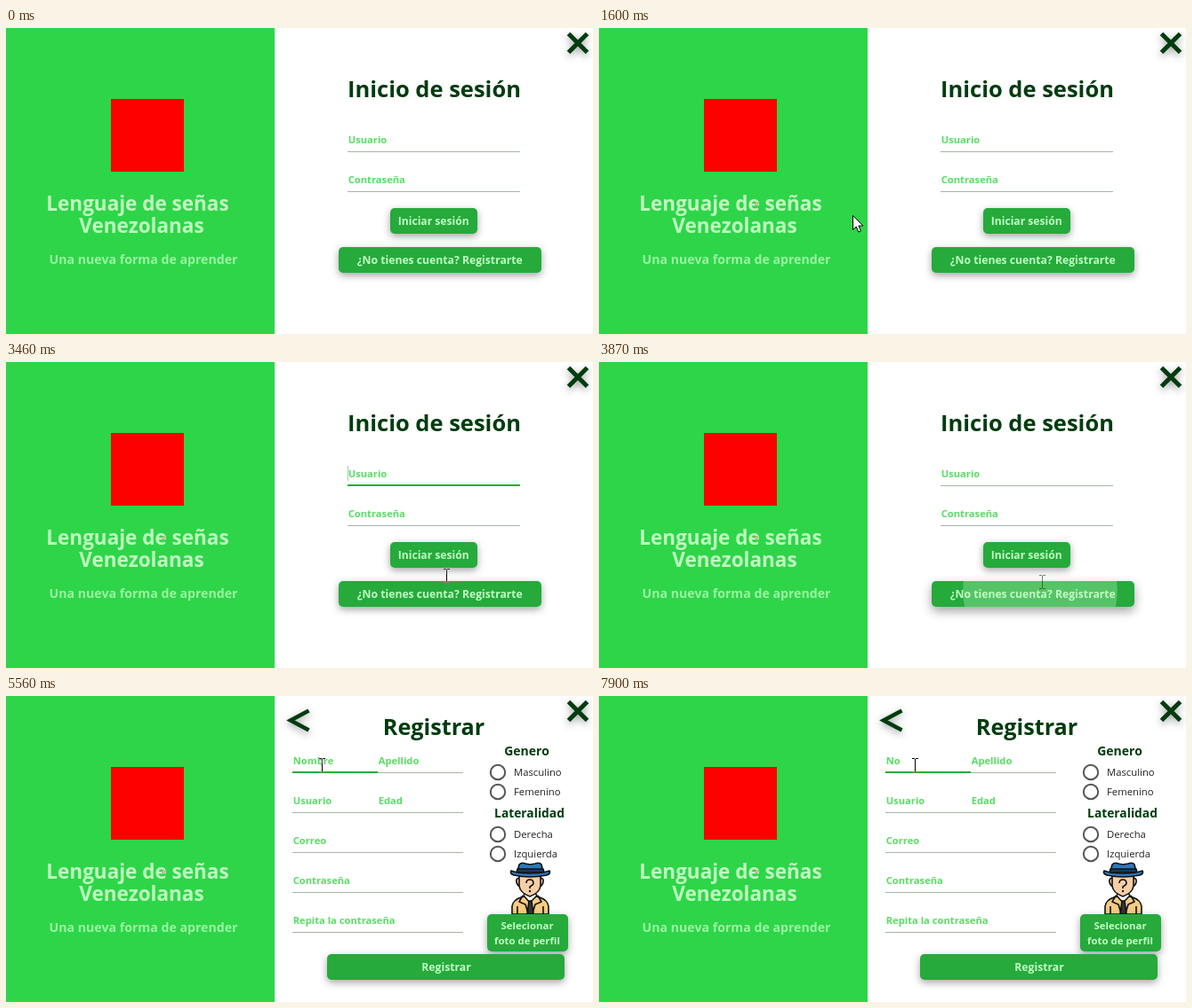
Recreate the animation shown at these times as an HTML page. Size 660x345 px, loop 8 s.

```html
<!DOCTYPE html>
<html lang="es">
<head>
<meta charset="utf-8">
<title>Inicio de sesión</title>
<style>
html, body { margin: 0; width: 100%; height: 100%; overflow: hidden; background: #fff; }
svg { display: block; width: 660px; height: 345px; }
text { font-family: "Open Sans", "Noto Sans", sans-serif; font-weight: 700; }
.mid { text-anchor: middle; }
.prompt { font-size: 11.2px; fill: #57dd62; }
.dark { fill: #003c0f; }
.plain { font-size: 11.3px; font-weight: 400; fill: #222; }
.btn { fill: #26aa3b; filter: drop-shadow(0 3px 4.5px rgba(0,0,0,.36)); }
.raised { filter: drop-shadow(0 5px 6px rgba(0,0,0,.36)); }
.label { fill: #c0ffc3; text-anchor: middle; }
.icon { fill: none; stroke: #003c0f; filter: drop-shadow(0 3px 4px rgba(0,0,0,.38)); }
#beam { mix-blend-mode: difference; }
.solid { stroke: #fff; }
.ghost { stroke: #a06080; }
</style>
</head>
<body>
<svg id="stage" viewBox="0 0 660 345" xmlns="http://www.w3.org/2000/svg"></svg>
<script>
const LOOP = 8000;
const GREEN = '#26aa3b';

const text = (x, y, s, cls, size, extra = '') =>
  `<text x="${x}" y="${y}" class="${cls}" ${size ? `font-size="${size}"` : ''} ${extra}>${s}</text>`;
const button = (x, y, w, h, id = '') =>
  `<rect x="${x}" y="${y}" width="${w}" height="${h}" rx="5" class="btn" ${id && `id="${id}"`}/>`;
const rule = (x, y, w) => `<rect x="${x}" y="${y}" width="${w}" height="1" fill="#a3b8a6"/>`;
const field = (x, y, w, s, id = '') => rule(x, y + 9, w) + text(x + 0.7, y, s, 'prompt', 0, id && `id="${id}"`);
const focusBar = (id, y) => `<rect id="${id}" y="${y}" height="2" fill="${GREEN}"/>`;
const caret = id => `<rect id="${id}" width="1" height="17" fill="#a9cdae"/>`;
const radio = (y, s) =>
  `<circle cx="553" cy="${y}" r="8.2" fill="#fff" stroke="#565656" stroke-width="2"/>` +
  text(571, y + 4, s, 'plain');

const brand = `
  <rect width="302" height="345" fill="#2ed549"/>
  <rect x="118" y="80" width="82" height="82" fill="#f00"/>
  ${text(148, 206, 'Lenguaje de señas', 'mid', 22.5, 'fill="#c0fcc0"')}
  ${text(152.5, 231, 'Venezolanas', 'mid', 22.5, 'fill="#c0fcc0"')}
  ${text(154.5, 266, 'Una nueva forma de aprender', 'mid', 14.15, 'fill="#9bf3a1"')}
  <circle id="speck" cx="177" cy="198" r="1.6" fill="none" stroke="#d98c72"/>`;

const login = `
  ${text(481.5, 78, 'Inicio de sesión', 'mid dark', 25.5)}
  ${field(384, 130, 194, 'Usuario')}
  ${field(384, 175, 194, 'Contraseña')}
  ${focusBar('userBar', 138)}${caret('userCaret')}
  ${button(432, 203, 98, 29)}
  ${text(480.7, 222, 'Iniciar sesión', 'label', 12.1)}
  ${button(374, 247, 228, 29, 'join')}
  <circle id="ripple" cx="496" cy="258" fill="#b8f5c0" opacity=".33" clip-path="url(#clip)"/>
  ${text(487.8, 266, '¿No tienes cuenta? Registrarte', 'label', 12.2)}`;

const avatar = `
  <g stroke="#111" stroke-width="1.6" stroke-linejoin="round">
    <path d="M569 246V237Q570 230 579 227L589 224L600 227Q609 230 610 237V246Z" fill="#f6cb83"/>
    <path d="M582 225L589 233L597 225L594 221H584Z" fill="#fff"/>
    <path d="M588 231L586 246H593L591 231Z" fill="#33363d"/>
    <path d="M581 225L577 232L584 235L587 245M598 225L602 232L595 235L592 245" fill="none"/>
    <path d="M575 237V246M604 237V246" fill="none"/>
    <path d="M577 205Q573 206 574 210T578 215M601 205Q605 206 604 210T600 215" fill="#f8cfa4"/>
    <path d="M577 201H601V214Q600 222 589 226Q578 222 577 214Z" fill="#f8cfa4"/>
    <path d="M575 198L577 190Q580 187 584 189L589 190L595 189Q600 187 602 190L604 198Z" fill="#2c78bd"/>
    <path d="M575 195H604L605 199H574Z" fill="#173c5c"/>
    <path d="M568 197Q566 200 571 202Q589 206 608 202Q613 200 611 197Q604 200 589 200Q575 200 568 197Z" fill="#2c78bd"/>
    <path d="M585 211Q585 207 589 207T593 211Q593 213 589 215V217" fill="none"/>
  </g>
  <circle cx="589" cy="220" r="1.2" fill="#111"/>`;

const signup = `
  <path d="M340.5 16.5L320 27.5L340.5 38.5" class="icon" stroke-width="4.6"/>
  ${text(481, 44, 'Registrar', 'mid dark', 25.2)}
  ${field(322, 77, 96, 'Nombre', 'first')}${field(418, 77, 96, 'Apellido')}
  ${field(322, 122, 96, 'Usuario')}${field(418, 122, 96, 'Edad')}
  ${field(322, 167, 192, 'Correo')}
  ${field(322, 212, 192, 'Contraseña')}
  ${field(322, 257, 192, 'Repita la contraseña')}
  ${focusBar('nameBar', 85)}${caret('nameCaret')}
  ${text(585.5, 67, 'Genero', 'mid dark', 14)}
  ${radio(86, 'Masculino')}${radio(108, 'Femenino')}
  ${text(588.5, 137, 'Lateralidad', 'mid dark', 13.8)}
  ${radio(156, 'Derecha')}${radio(178, 'Izquierda')}
  ${avatar}
  ${button(541, 246, 91, 42)}
  ${text(586, 263, 'Selecionar', 'label', 11.4)}
  ${text(586, 280, 'foto de perfil', 'label', 11.4)}
  ${button(361, 291, 267, 29)}
  ${text(495, 310, 'Registrar', 'label', 12.2)}`;

document.getElementById('stage').innerHTML = `
  <defs><clipPath id="clip"><rect x="374" y="247" width="228" height="29" rx="5"/></clipPath></defs>
  <rect width="660" height="345" fill="#fff"/>
  ${brand}
  <path d="M632.5 6.5L653.5 27.5M653.5 6.5L632.5 27.5" class="icon" stroke-width="5"/>
  <g id="login">${login}</g>
  <g id="signup">${signup}</g>
  <path id="arrow" d="M.5 .5V16.5L4.2 13L6.8 19L9.4 17.9L6.9 12H11.8Z" fill="#fff" stroke="#000"/>
  <path id="beam" d="M-3 -7.5H0M1 -7.5H4M.5 -7V7M-3 7.5H0M1 7.5H4" fill="none"/>`;

const $ = id => document.getElementById(id);
const show = (id, on) => $(id).setAttribute('display', on ? 'inline' : 'none');
const set = (id, attrs) => { for (const k in attrs) $(id).setAttribute(k, attrs[k]); };
const clamp = v => Math.max(0, Math.min(1, v));

// Pointer path: time, x, y
const path = [
  [370, 612, 330], [600, 560, 215], [850, 440, 92], [1110, 303, 150], [1180, 268, 172],
  [1390, 150, 192], [1600, 285, 211], [1670, 285, 211], [1800, 420, 100], [1950, 471, 128],
  [2540, 471, 128], [2690, 471, 165], [2750, 471, 171], [2890, 471, 184], [3140, 471, 184],
  [3500, 498, 248], [4130, 498, 248], [4450, 347, 53], [4540, 350, 56], [4670, 350, 56],
  [4890, 355, 78]
];

function pointer(t) {
  const i = path.findIndex(p => p[0] > t);
  if (i < 0) return path[path.length - 1].slice(1);
  if (i === 0) return path[0].slice(1);
  const [a, b] = [path[i - 1], path[i]];
  const k = (t - a[0]) / (b[0] - a[0]);
  return [1, 2].map(n => Math.round(a[n] + (b[n] - a[n]) * k));
}

// The focus bar opens from the middle of its field
function growBar(id, x, w, k) {
  const e = 1 - (1 - clamp(k)) ** 2;
  set(id, { x: x + w * (1 - e) / 2, width: w * e });
}

function draw(t) {
  const opened = t >= 3930, clicked = t >= 3600;
  show('login', !opened);
  show('signup', opened);
  show('speck', t >= 1400);

  growBar('userBar', 384, 194, clicked ? 0 : (t - 2010) / 290);
  show('userCaret', t >= 2010 && !clicked);
  set('userCaret', { x: 384, y: 117 });
  set('join', { class: clicked ? 'btn raised' : 'btn' });
  set('ripple', { r: clicked ? (t - 3600) * 0.32 : 0 });

  growBar('nameBar', 322, 96, (t - 4950) / 210);
  const typed = t < 6220 ? 0 : t < 7370 ? 1 : 2;
  $('first').textContent = ['Nombre', 'N', 'No'][typed];
  const caretOn = (t >= 5020 && t < 5560) || (t >= 6090 && t < 6700) || (t >= 7170 && t < 7900);
  show('nameCaret', caretOn);
  set('nameCaret', { x: [322, 332, 340][typed], y: 64 });

  const [x, y] = pointer(t);
  const beam = (t >= 1850 && t < 4130) || t >= 4750;
  show('arrow', t >= 370 && !beam);
  show('beam', beam);
  set(beam ? 'beam' : 'arrow', { transform: `translate(${x} ${y})` });
  set('beam', { class: clicked && !opened ? 'ghost' : 'solid' });
}

const start = performance.now();
function tick() {
  draw((performance.now() - start) % LOOP);
  requestAnimationFrame(tick);
}
tick();
</script>
</body>
</html>
```
